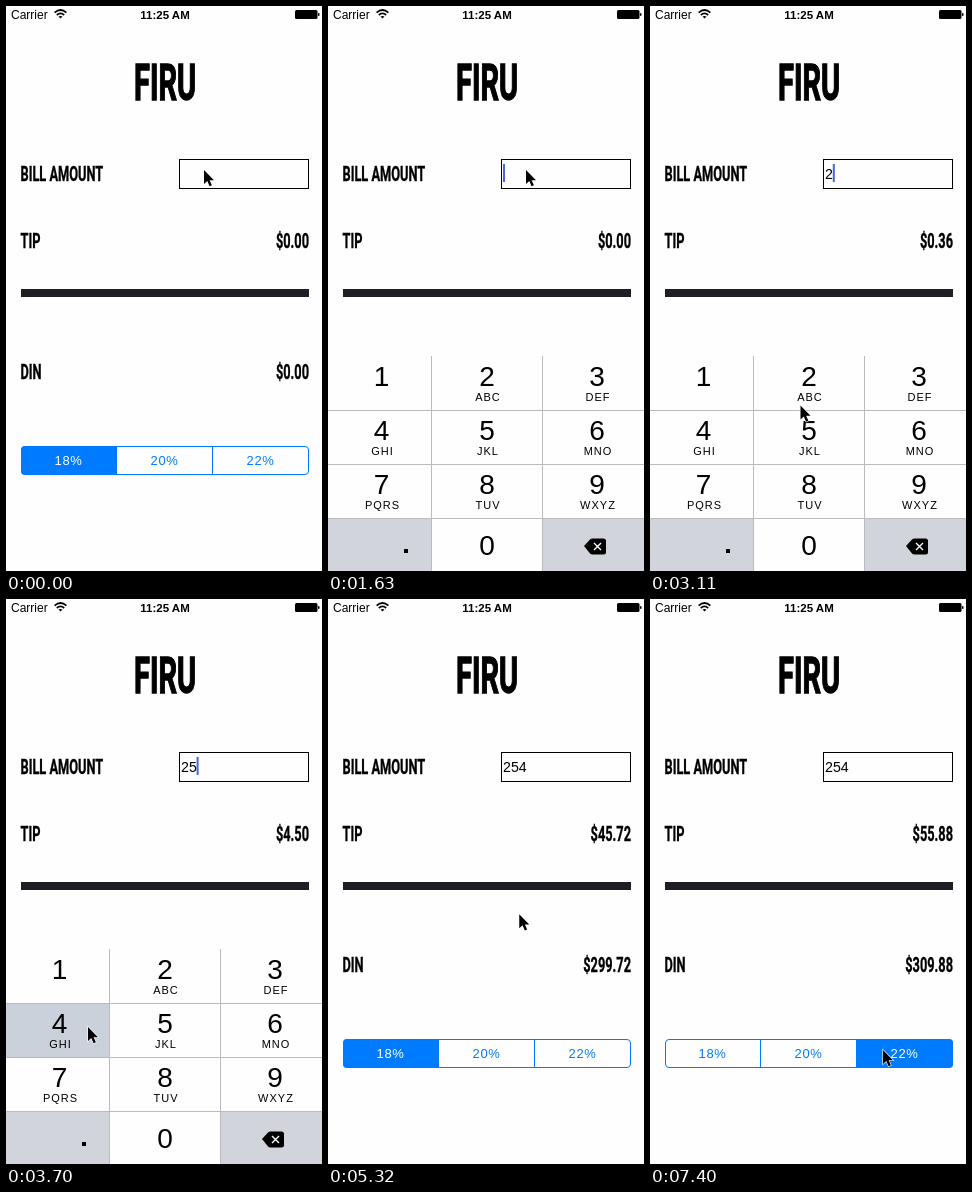
Write an HTML page that moves like this. It is 316 px wide and 565 px high and loops after 8000 ms.

```html
<!DOCTYPE html>
<html lang="en">
<head>
<meta charset="utf-8">
<title>Tip calculator</title>
<style>
  html, body { margin: 0; width: 100%; height: 100%; overflow: hidden; background: #fefefe; }
  svg { display: block; width: 316px; height: 565px; }
  text { font-family: "Liberation Sans", Arial, sans-serif; white-space: pre; }
  .din { font: 700 20px Roboto, sans-serif; stroke: #000; stroke-width: .35; }
  .title { font-size: 50px; stroke-width: 1.4; }
  .mid { text-anchor: middle; }
  .end { text-anchor: end; }
  .digit { font-size: 28px; }
  .letters { font-size: 11px; letter-spacing: 1px; }
  .seg { font-size: 13px; letter-spacing: .6px; }
</style>
</head>
<body>
<svg id="stage" viewBox="0 0 316 565" xmlns="http://www.w3.org/2000/svg">
  <rect width="316" height="565" fill="#fefefe"/>

  <text x="5" y="12.5" font-size="12">Carrier</text>
  <g fill="none" stroke="#000" stroke-width="1.7">
    <path d="M48.6 6.6Q54.5 1.4 60.4 6.6M50.8 9Q54.5 5.8 58.2 9"/>
    <path d="M54.5 12.6L52.5 10.6Q54.5 9.2 56.5 10.6Z" fill="#000" stroke="none"/>
  </g>
  <text class="mid" x="159" y="12.5" font-size="11.5" font-weight="700">11:25 AM</text>
  <rect x="289" y="4" width="22.5" height="9" rx="1.5"/>
  <rect x="312" y="7" width="1.5" height="3" rx=".7"/>

  <text class="din title mid" transform="translate(159 94) scale(.58 1)">FIRU</text>
  <text class="din" transform="translate(14.5 175) scale(.64 1)">BILL AMOUNT</text>
  <text class="din" transform="translate(14.5 242) scale(.64 1)">TIP</text>
  <text class="din" transform="translate(14.5 373) scale(.64 1)">DIN</text>
  <text class="din end" id="tip" transform="translate(303 242) scale(.64 1)"></text>
  <text class="din end" id="total" transform="translate(303 373) scale(.64 1)"></text>
  <rect x="15" y="283" width="288" height="8" fill="#1e1f25"/>

  <rect x="173.5" y="153.5" width="129" height="29" fill="none" stroke="#000"/>
  <text id="bill" x="175" y="173" font-size="14.2"></text>
  <rect id="caret" y="158" width="2" height="18" fill="#4468dc"/>

  <clipPath id="round"><rect x="15" y="440" width="288" height="29" rx="4"/></clipPath>
  <g id="segments" clip-path="url(#round)"></g>
  <rect x="15.5" y="440.5" width="287" height="28" rx="3.5" fill="none" stroke="#007aff"/>
  <path d="M110.5 441V468M206.5 441V468" stroke="#007aff"/>

  <g id="pad">
    <rect y="350" width="316" height="216" fill="#fefefe"/>
    <path d="M0 512H104V566H0ZM214 512H316V566H214Z" fill="#d1d5db"/>
    <rect id="press" width="110" height="54" fill="#cbd1da"/>
    <path d="M0 404.5H316M0 458.5H316M0 512.5H316M103.5 350V566M214.5 350V566" stroke="#b9bbbf"/>
    <g id="keys"></g>
    <text class="digit mid" x="159" y="549">0</text>
    <rect x="76" y="543" width="4" height="4"/>
    <path d="M256 540L262 533.5Q263 532.5 264.500 532.5H275.500Q278 532.5 278 535V546Q278 548.500 275.500 548.500H264.500Q263 548.500 262 547.500Z"/>
    <path d="M266 537L273 544M273 537L266 544" stroke="#fff" stroke-width="1.4"/>
  </g>

  <path id="cursor" d="M0 0V14L3.300 11L5.600 16.300L7.900 15.300L5.600 10.200H10Z"
        stroke="#fff" stroke-width="1.2" paint-order="stroke"/>
</svg>
<script>
const LOOP = 8000, START = 1331, STEP = 147.6;
const COLS = [53.5, 159, 269], EDGES = [0, 104, 215];
const LETTERS = ["", "ABC", "DEF", "GHI", "JKL", "MNO", "PQRS", "TUV", "WXYZ"];
const BLUE = "#007aff", PALE = "#d6eaff", CLEAR = "#fefefe";

// Each row: step, value; held until the next row
const PAD = [[-1, 216], [0, 66], [1, 8], [2, 0], [25, 70], [26, 192], [27, 216]];
const BILL = [[-1, ""], [11, "2"], [14, "25"], [17, "254"]];
const PRESS = [[-1, 0], [10, 2], [11, 0], [13, 5], [14, 0], [16, 4], [17, 0]];
const RATE = [[-1, 18], [34, 20], [41, 22]];
const CARET = [[-1, 0], [0, 1], [25, 0]];
const FILLS = [[-1, [BLUE, CLEAR, CLEAR]], [33, [BLUE, PALE, CLEAR]], [34, [PALE, BLUE, CLEAR]],
  [35, [CLEAR, BLUE, CLEAR]], [40, [CLEAR, BLUE, PALE]], [41, [CLEAR, CLEAR, BLUE]]];
// Pointer stops: step, x, y
const PATH = [[-1, 198, 164], [2, 198, 164], [9, 151, 371], [11, 151, 371], [13, 150, 428],
  [14, 150, 428], [15, 82, 428], [18, 82, 428], [24, 196, 304], [26, 196, 304],
  [32, 132, 455], [34, 132, 455], [38, 233, 451], [41, 233, 451]];

const $ = id => document.getElementById(id);
const held = (rows, n) => rows.filter(r => r[0] <= n).pop()[1];
const money = v => "$" + v.toFixed(2);

function add(parent, tag, attrs, label = "") {
  const el = document.createElementNS("http://www.w3.org/2000/svg", tag);
  for (const k in attrs) el.setAttribute(k, attrs[k]);
  el.textContent = label;
  parent.append(el);
  return el;
}

LETTERS.forEach((word, i) => {
  const x = COLS[i % 3], y = 350 + 54 * Math.floor(i / 3);
  add($("keys"), "text", { class: "digit mid", x, y: y + 30 }, i + 1);
  add($("keys"), "text", { class: "letters mid", x: x + 1, y: y + 45 }, word);
});

const segments = [18, 20, 22].map((pct, i) => ({
  box: add($("segments"), "rect", { x: 15 + 96 * i, y: 440, width: 96, height: 29 }),
  label: add($("segments"), "text", { class: "seg mid", x: 62.5 + 96 * i, y: 459 }, pct + "%")
}));

function pointer(n) {
  const i = Math.max(1, PATH.findIndex(p => p[0] >= n));
  const [a, x0, y0] = PATH[i - 1], [b, x1, y1] = PATH[i];
  const u = (n - a) / (b - a), e = u * u * (3 - 2 * u);
  return [x0 + (x1 - x0) * e, y0 + (y1 - y0) * e];
}

function draw(t) {
  const n = Math.max(-1, Math.min(41, Math.floor((t - START) / STEP)));
  const bill = held(BILL, n), tip = bill * held(RATE, n) / 100, key = held(PRESS, n);

  $("bill").textContent = bill;
  $("tip").textContent = money(tip);
  $("total").textContent = money(+bill + tip);
  $("caret").setAttribute("x", 175 + 7.8 * bill.length);
  $("caret").setAttribute("opacity", held(CARET, n));
  $("pad").setAttribute("transform", `translate(0 ${held(PAD, n)})`);

  $("press").setAttribute("opacity", key ? 1 : 0);
  if (key) {
    const col = (key - 1) % 3;
    $("press").setAttribute("x", EDGES[col]);
    $("press").setAttribute("width", col ? 110 : 103);
    $("press").setAttribute("y", 350 + 54 * Math.floor((key - 1) / 3));
  }

  held(FILLS, n).forEach((fill, i) => {
    segments[i].box.setAttribute("fill", fill);
    segments[i].label.setAttribute("fill", fill === BLUE ? "#fff" : BLUE);
  });

  $("cursor").setAttribute("transform", `translate(${pointer(n)})`);
}

const begin = performance.now();
function tick() {
  draw((performance.now() - begin) % LOOP);
  requestAnimationFrame(tick);
}
tick();
</script>
</body>
</html>
```
